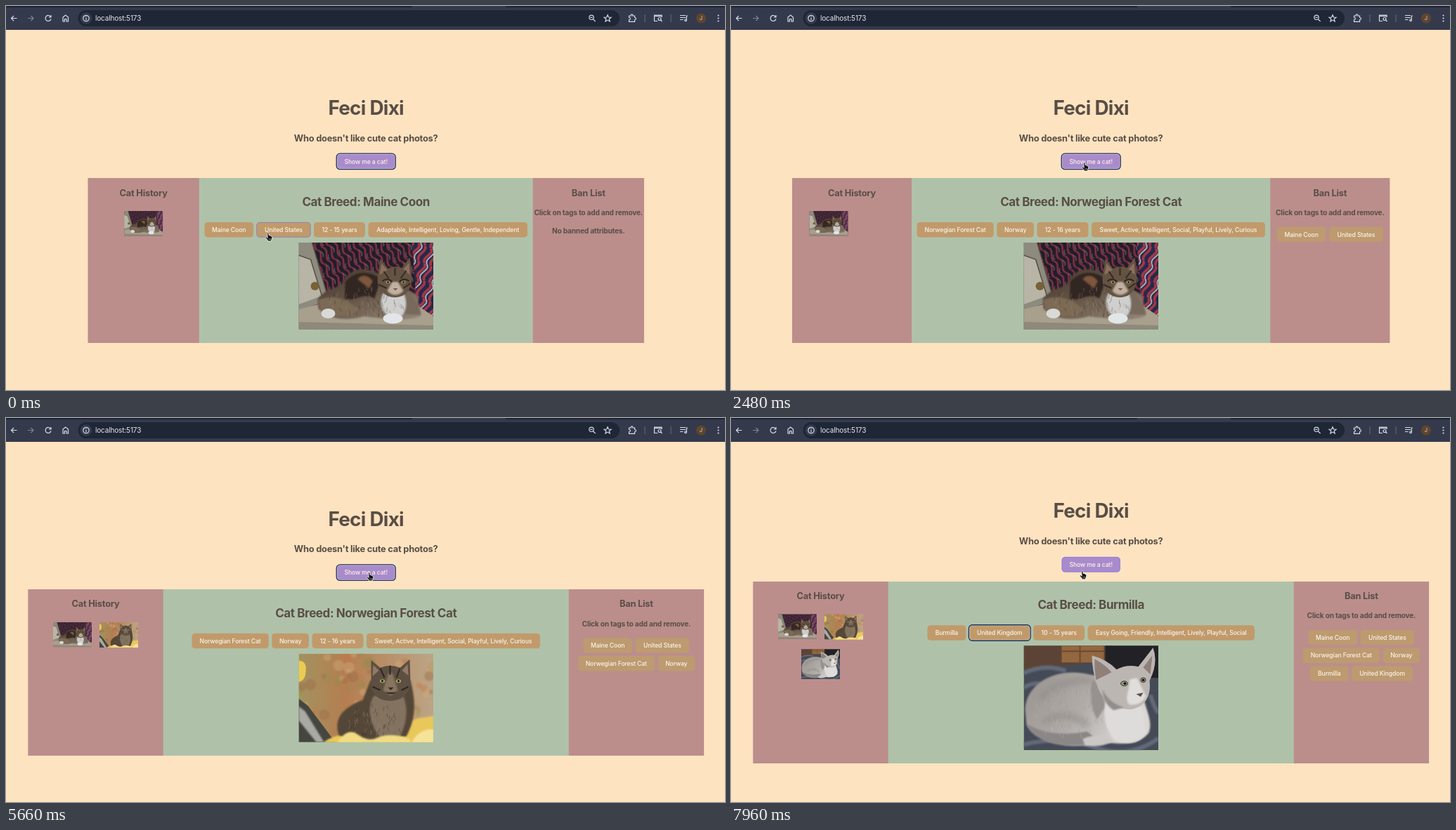
Write an HTML page that moves like this. It is 1023 px wide and 547 px high and loops after 8 s.

```html
<!DOCTYPE html>
<html lang="en">
<head>
<meta charset="utf-8">
<title>Cat photos</title>
<style>
  html, body { margin: 0; width: 100%; height: 100%; overflow: hidden; background: #fee3c1; }
  svg { display: block; }
  #stage { position: absolute; left: 0; top: 0; }
  text { font-family: Inter, Roboto, sans-serif; font-optical-sizing: none; text-anchor: middle; fill: #594e45; }
  .title { font-size: 27.8px; font-weight: 700; letter-spacing: -.025em; }
  .breed { font-size: 17px; font-weight: 700; letter-spacing: -.024em; }
  .head { font-size: 12.8px; font-weight: 700; letter-spacing: -.016em; }
  .note { font-size: 10.1px; font-weight: 700; letter-spacing: -.018em; }
  .tag { font-size: 8.6px; font-weight: 500; letter-spacing: -.011em; fill: #fbf4ea; }
  .url { font-size: 10px; letter-spacing: -.015em; text-anchor: start; fill: #e6e8ee; }
  .avatar { font-size: 7.5px; fill: #e9dccf; }
</style>
</head>
<body>
<svg id="stage" width="1023" height="547" viewBox="0 0 1023 547">
  <defs>
    <filter id="soft" x="-10%" y="-10%" width="120%" height="120%"><feGaussianBlur stdDeviation="1.3"/></filter>
    <filter id="hazy" x="-20%" y="-20%" width="140%" height="140%"><feGaussianBlur stdDeviation="4"/></filter>
    <pattern id="fabric" width="17" height="21" patternUnits="userSpaceOnUse" patternTransform="rotate(-24)">
      <rect width="17" height="21" fill="#211d2b"/>
      <path d="M3 0C11 5-3 14 3 21M12 0C19 7 6 14 12 21" fill="none" stroke="#80303f" stroke-width="2.6"/>
      <path d="M6 3Q10 8 6 12M15 12Q11 16 14 19" fill="none" stroke="#958087" stroke-width=".9"/>
    </pattern>
    <pattern id="flag" width="19" height="23" patternUnits="userSpaceOnUse" patternTransform="rotate(24)">
      <rect width="19" height="23" fill="#25294b"/>
      <path d="M4 0C13 6-3 15 4 23M14 0C21 7 7 15 14 23" fill="none" stroke="#a93745" stroke-width="3.6"/>
      <path d="M8 0C17 6 1 15 8 23" fill="none" stroke="#cfc6cb" stroke-width="1.7"/>
    </pattern>
    <linearGradient id="coat" x1="0" x2="1" y1="0" y2="1">
      <stop stop-color="#44362c"/><stop offset=".5" stop-color="#685849"/><stop offset="1" stop-color="#94877a"/>
    </linearGradient>
    <linearGradient id="autumn" x2="1">
      <stop stop-color="#a2935f"/><stop offset=".35" stop-color="#b67d50"/><stop offset="1" stop-color="#bca586"/>
    </linearGradient>
    <linearGradient id="silver" x1="0" x2="1" y1="0" y2=".4">
      <stop stop-color="#98938f"/><stop offset=".55" stop-color="#b0aba7"/><stop offset="1" stop-color="#dad7d5"/>
    </linearGradient>

    <symbol id="photo0" viewBox="0 0 191.5 123.5" preserveAspectRatio="none">
      <rect width="192" height="124" fill="url(#fabric)"/>
      <path d="M161 0H192V108L168 92Z" fill="url(#flag)"/>
      <path d="M0 0H19L43 82 0 97Z" fill="#8d8b7e"/>
      <path d="M0 18L17 24 33 76 0 88Z" fill="#b8b5a6"/>
      <path d="M19 0L42 80M0 18L17 24 33 76" fill="none" stroke="#5b5146" stroke-width="1.6"/>
      <circle cx="23" cy="62" r="6" fill="#776136"/>
      <path d="M0 95L44 84 165 87 192 105V124H0Z" fill="#a89f8c"/>
      <path d="M0 113L192 118V124H0Z" fill="#8f897b"/>
      <g filter="url(#soft)">
        <path d="M27 80C44 60 57 69 66 52 76 34 101 34 119 48L168 74 174 104C156 114 110 107 93 105 64 113 41 108 28 94Z" fill="url(#coat)"/>
        <path d="M66 56C80 38 104 40 117 52L108 80C90 70 82 85 65 80Z" fill="#332821"/>
        <path d="M84 52C92 44 100 48 105 55L100 65Z" fill="#7d573c"/>
        <path d="M28 82C48 73 70 80 85 96 65 110 43 106 31 96Z" fill="#7c6a55"/>
        <path d="M148 72C165 76 173 90 174 103L150 102Z" fill="#77695b"/>
        <path d="M121 72C114 84 118 99 128 104H147C154 96 154 82 149 72Z" fill="#cfcfce"/>
      </g>
      <g id="strands0"></g>
      <path d="M112 52L116 23 127 37Q138 32 147 36L158 21 161 52C160 69 150 78 137 78 122 78 112 66 112 52Z" fill="#645342"/>
      <path d="M115 46L118 30 126 39ZM149 38L157 29 158 46Z" fill="#8c6f5d"/>
      <path d="M121 41L128 51M137 36V47M153 40L145 51M114 60L125 65M159 58L149 65" stroke="#352a22" stroke-width="2"/>
      <path d="M133 56H141L149 69Q137 80 126 69Z" fill="#bfb1a1" filter="url(#soft)"/>
      <path d="M119 55Q126 49 133 56M143 56Q150 49 157 55" fill="none" stroke="#30251e" stroke-width="2"/>
      <ellipse cx="127" cy="56.5" rx="2.8" ry="1.9" fill="#a8a16b"/><ellipse cx="149" cy="56.5" rx="2.8" ry="1.9" fill="#a8a16b"/>
      <circle cx="127" cy="56.5" r="1.2"/><circle cx="149" cy="56.5" r="1.2"/>
      <path d="M134 65H141L137.5 68.5Z" fill="#84594f"/>
      <ellipse cx="134" cy="108" rx="14" ry="7.5" fill="#e2e6e8"/>
      <ellipse cx="42" cy="101" rx="10" ry="7" fill="#d8dad8"/>
    </symbol>

    <symbol id="photo1" viewBox="0 0 191.5 126" preserveAspectRatio="none">
      <rect width="192" height="126" fill="url(#autumn)"/>
      <g id="leaves" filter="url(#soft)"></g>
      <path d="M0 10Q12 10 10 26 9 39 0 40Z" fill="#eccb52"/>
      <path d="M0 64L13 74 52 126H0Z" fill="#45463f"/>
      <path d="M0 75L9 82 36 126H25L0 95Z" fill="#a9aaa3" filter="url(#soft)"/>
      <path d="M36 126C52 113 68 118 83 109 104 123 127 103 146 114 160 86 174 94 192 88V130H36Z" fill="#e9c85a" filter="url(#soft)"/>
      <g filter="url(#soft)">
        <path d="M57 116C49 92 64 76 91 66L102 38H159C167 69 167 92 153 118L105 126 72 122Z" fill="#554738"/>
        <path d="M107 60C95 78 103 106 117 120H143C152 103 157 82 149 61Z" fill="#82725f"/>
      </g>
      <g id="strands1"></g>
      <path d="M103 42L103 9 116 20Q130 14 144 20L158 8 159 43C156 60 145 67 130 67 114 67 104 59 103 42Z" fill="#5d4f41"/>
      <path d="M105 32L106 16 114 24ZM147 24L155 15 156 31Z" fill="#93796a"/>
      <path d="M128 27H133L141 52 131 60 120 52Z" fill="#877460" filter="url(#soft)"/>
      <path d="M116 21L122 34M130 17V30M144 21L139 34M105 47L116 52M156 47L146 52" stroke="#2e2721" stroke-width="2"/>
      <ellipse cx="119" cy="39" rx="3.6" ry="2.5" fill="#aaa45f"/><ellipse cx="142" cy="39" rx="3.6" ry="2.5" fill="#aaa45f"/>
      <circle cx="119" cy="39" r="1.4"/><circle cx="142" cy="39" r="1.4"/>
      <path d="M127 48H135L131 52ZM123 55Q131 60 139 55" fill="#352b27"/>
      <path d="M54 128Q69 104 84 115T111 120 143 117 158 128Z" fill="#f2dc83" filter="url(#soft)"/>
      <path d="M160 128Q171 106 192 108V128Z" fill="#f6e39a" filter="url(#soft)"/>
    </symbol>

    <symbol id="photo2" viewBox="0 0 191.5 149" preserveAspectRatio="none">
      <rect width="192" height="149" fill="#454a57"/>
      <path d="M0 0H126V22L0 34Z" fill="#5b4436"/>
      <path d="M54 0H114V24H54Z" fill="#93673f"/>
      <path d="M54 8H114M80 0V24" stroke="#6b4a31" stroke-width="2"/>
      <path d="M116 0H192V46H116Z" fill="#222226"/>
      <path d="M0 39Q30 25 60 36M0 60Q15 50 30 56M0 141Q52 128 101 145T192 132M180 70Q186 90 192 96" fill="none" stroke="#626978" stroke-width="6" filter="url(#soft)"/>
      <g filter="url(#soft)">
        <path d="M2 91C3 54 47 28 97 42L119 43 170 72C174 93 184 107 178 124 163 144 132 140 112 137 65 151 16 139 4 113Z" fill="url(#silver)"/>
        <path d="M5 112Q40 132 90 122L108 136C65 150 16 139 5 112Z" fill="#8b8786"/>
        <path d="M98 48Q113 62 116 88L104 105Q90 78 98 48Z" fill="#97928f"/>
      </g>
      <path d="M22 76Q52 46 97 50M28 110Q59 88 92 114" fill="none" stroke="#8a8684" stroke-width="8" opacity=".6" filter="url(#hazy)"/>
      <g id="strands2"></g>
      <path d="M121 70C110 91 114 117 129 134 155 145 169 135 175 122 166 108 176 90 159 75Z" fill="#dedcda" filter="url(#soft)"/>
      <path d="M105 58Q97 36 97 14 119 20 132 34 147 26 163 30L184 3Q192 24 179 50C182 75 170 89 151 91 123 89 111 75 105 58Z" fill="#bbb6b2"/>
      <path d="M103 49Q100 31 101 19 117 28 125 38ZM170 31L183 14 180 41Z" fill="#8f807a"/>
      <path d="M151 48L161 46 174 72Q167 86 150 84 144 76 149 63Z" fill="#e0ddda" filter="url(#soft)"/>
      <path d="M112 62Q121 82 143 88L128 92Q113 83 112 62Z" fill="#918d8a" filter="url(#soft)"/>
      <ellipse cx="143" cy="54" rx="5" ry="3.5" fill="#8d9069" stroke="#37393b"/>
      <ellipse cx="170" cy="49" rx="3.6" ry="3.4" fill="#8d9069" stroke="#37393b"/>
      <circle cx="144" cy="54" r="1.7"/><circle cx="170" cy="49" r="1.6"/>
      <path d="M160 69L170 67 166.5 73Z" fill="#5d4d4b"/>
      <path d="M84 133Q111 121 128 136 110 146 87 142Z" fill="#cbc7c4" filter="url(#soft)"/>
    </symbol>
  </defs>

  <rect width="1023" height="547" fill="#fee3c1"/>
  <g id="page"></g>

  <g id="browser">
    <rect width="1023" height="34" fill="#343a4c"/>
    <rect width="1023" height="2" fill="#1d2435"/>
    <rect x="578" width="133" height="2" fill="#343a4c"/>
    <rect x="102.5" y="6" width="770.5" height="23" rx="11.5" fill="#1f2636"/>
    <circle cx="114" cy="17.5" r="8.3" fill="#343b4d"/>
    <text class="url" x="127" y="21.2">localhost:5173</text>
    <g fill="none" stroke="#d7dbe5" stroke-width="1.2">
      <path d="M15.5 17.5H7.5M11 14L7.5 17.5 11 21"/>
      <path d="M31 17.5H39M35.5 14L39 17.5 35.5 21" stroke="#7d8493"/>
      <path d="M63.5 15.3A4 4 0 1 0 64 18.5M64 13V16H61"/>
      <path d="M81 22V16L84.7 13 88.5 16V22H86V18.5H83.4V22Z"/>
      <circle cx="114" cy="17.5" r="4.2"/><path d="M114 17V20M114 14.8V15.8"/>
      <circle cx="833" cy="16.3" r="3.2"/><path d="M835.4 18.8L838.6 22M831.5 16.3H834.5"/>
      <path d="M856 12.7L857.4 16 861 16.2 858.2 18.5 859.1 22 856 20.1 852.9 22 853.8 18.5 851 16.2 854.6 16Z"/>
      <path d="M886.5 14H889.3Q889 11.8 890.5 11.8T891.7 14H894.5V16.5Q896.5 16.5 896.5 18T894.5 19.5V22.3H886.5V19.5Q888.5 19.5 888.5 18T886.5 16.5Z"/>
      <path d="M909 12V23M946 12V23" stroke="#626a7b" stroke-width="1"/>
      <path d="M927 21.5H922.5V13.2H933V16M922.5 14.5H933"/><circle cx="930" cy="18.5" r="2"/><path d="M931.5 20L933.5 22"/>
      <path d="M959 13.5H967M959 16.5H967M959 19.5H963.5M968.3 20V14H970"/><circle cx="967" cy="20.3" r="1.3"/>
    </g>
    <circle cx="989" cy="17.5" r="7" fill="#60452f"/>
    <text class="avatar" x="989" y="20.2">J</text>
    <g fill="#d7dbe5"><circle cx="1013.5" cy="13.5" r="1.1"/><circle cx="1013.5" cy="17.5" r="1.1"/><circle cx="1013.5" cy="21.5" r="1.1"/></g>
  </g>

  <g id="cursor">
    <path d="M-2.4-5.4C-1.9-6.5-.5-6.3-.3-5.1L.2-2.2C.9-2.7 1.7-2.4 1.9-1.7 2.7-2 3.4-1.6 3.5-.9 4.4-1 4.9-.4 4.8.5L4.4 3 3.4 4.6V6H-1.7V4.7L-4.6 1.3C-5 .4-3.9-.3-3.1.3L-1.8 1.4Z" fill="#111" stroke="#fff" stroke-width=".8" stroke-linejoin="round"/>
    <path d="M0 2V4.4M1.4 2V4.4M2.8 2V4.4" stroke="#ddd" stroke-width=".45"/>
  </g>
</svg>

<script>
const LOOP = 8000, MID = 512.2, GAP = 4.5;
const $ = id => document.getElementById(id);
const SHOW = 'Show me a cat!';

// label and button width
const breeds = [
  { name: 'Maine Coon', height: 123.5, tags: [['Maine Coon', 69.5], ['United States', 77], ['12 - 15 years', 73],
    ['Adaptable, Intelligent, Loving, Gentle, Independent', 226.5]] },
  { name: 'Norwegian Forest Cat', height: 126, tags: [['Norwegian Forest Cat', 109.3], ['Norway', 52.7], ['12 - 16 years', 73],
    ['Sweet, Active, Intelligent, Social, Playful, Lively, Curious', 247]] },
  { name: 'Burmilla', height: 149, tags: [['Burmilla', 54.9], ['United Kingdom', 86.8], ['10 - 15 years', 73],
    ['Easy Going, Friendly, Intelligent, Lively, Playful, Social', 237.3]] }
];
const banOrder = breeds.flatMap(b => b.tags.slice(0, 2));

const events = [
  [0, { breed: 0, photo: 0, bans: 0, focus: SHOW }],
  [440, { focus: 'Maine Coon' }], [520, { bans: 1 }],
  [960, { focus: 'United States' }], [1050, { bans: 2 }],
  [1670, { focus: SHOW }], [2480, { breed: 1 }], [2570, { photo: 1 }],
  [3280, { focus: 'Norwegian Forest Cat' }], [3460, { bans: 3 }],
  [3810, { focus: 'Norway' }], [3980, { bans: 4 }],
  [5660, { focus: SHOW }], [6200, { breed: 2 }], [6290, { photo: 2 }],
  [6820, { focus: 'Burmilla' }], [7000, { bans: 5 }],
  [7260, { focus: 'United Kingdom' }], [7350, { bans: 6 }]
];

// first step, last step, number of steps, end point
const moves = [
  [80, 170, 2, 345, 336], [260, 350, 2, 320, 328], [610, 870, 4, 376.5, 328],
  [1220, 1580, 5, 504, 229], [2920, 3190, 4, 322, 319], [3540, 3720, 3, 405, 320],
  [4150, 4320, 3, 508, 322], [4410, 4940, 7, 620, 322], [5030, 5210, 3, 480, 318],
  [5300, 5570, 4, 518, 226], [6380, 6730, 5, 314, 309.5], [7080, 7170, 2, 378, 310],
  [7520, 7780, 4, 500, 223], [7960, 7960, 1, 501, 223.8]
];

function cursorAt(t) {
  let x = 374, y = 329;
  for (const [from, to, steps, endX, endY] of moves) {
    if (t < from) break;
    const gap = (to - from) / (steps - 1) || 1;
    const k = Math.min(steps, 1 + Math.floor((t - from) / gap + 1e-6)) / steps;
    x += (endX - x) * k;
    y += (endY - y) * k;
  }
  return [x, y];
}

const stateAt = t => Object.assign({}, ...events.filter(e => e[0] <= t).map(e => e[1]));

const sizes = { title: 27.8, breed: 17, head: 12.8, note: 10.1, tag: 8.6 };
const label = (s, x, y, cls) => `<text class="${cls}" x="${x}" y="${y + sizes[cls] * .364}">${s}</text>`;
const box = (x, y, w, h, attrs) => `<rect x="${x}" y="${y}" width="${w}" height="${h}" ${attrs}/>`;
const photo = (i, x, y, w) => `<use href="#photo${i}" x="${x}" y="${y}" width="${w}" height="${w * breeds[i].height / 191.5}"/>`;

function button({ text, x, y, w, fill }, focused, hovered) {
  let out = box(x, y, w, 21.5, `rx="4.5" fill="${fill}"`);
  if (focused) {
    out += box(x + .4, y + .4, w - .8, 20.7, 'rx="4.2" fill="none" stroke="#efe6e0" stroke-width=".7"');
    out += box(x - .5, y - .5, w + 1, 22.5, 'rx="5" fill="none" stroke="#18325a" stroke-width="1.3"');
  } else if (hovered) {
    out += box(x + .3, y + .3, w - .6, 20.9, 'rx="4.3" fill="none" stroke="#6a6ff0" stroke-width=".6"');
  }
  return out + label(text, x + w / 2, y + 10.8, 'tag');
}

function row(tags, center, y, fill) {
  let x = center - (tags.reduce((sum, tag) => sum + tag[1], 0) + GAP * (tags.length - 1)) / 2;
  return tags.map(([text, w]) => {
    const item = { text, x, y, w, fill };
    x += w + GAP;
    return item;
  });
}

const shiftOf = s => (breeds[0].height - breeds[s.photo].height) / 2;

const buttonsOf = s => [
  { text: SHOW, x: 470.7, y: 210.7 + shiftOf(s), w: 83, fill: '#a98bcb' },
  ...row(breeds[s.breed].tags, MID, 308 + shiftOf(s), '#c19a6b')
];

function drawPage(s, buttons, hovered) {
  const up = shiftOf(s);
  const left = s.bans > 2 ? 31.3 : s.breed ? 87 : 116.5;
  const side = (MID - left) * 2 / 5;
  const top = Math.round(245.3 + up), height = Math.round(479.6 - up) - top;
  const historyX = left + side / 2, banX = 2 * MID - historyX;
  let out = label('Feci Dixi', MID, 145 + up, 'title')
    + label("Who doesn't like cute cat photos?", MID, 188 + up, 'head')
    + box(left, top, side * 5, height, 'fill="#bb8e8c"')
    + box(left + side, top, side * 3, height, 'fill="#afc2a9"')
    + label('Cat History', historyX, 266 + up, 'head')
    + label('Ban List', banX, 266 + up, 'head')
    + label('Cat Breed: ' + breeds[s.breed].name, MID, 279 + up, 'breed')
    + label('Click on tags to add and remove.', banX, 294.5 + up, 'note')
    + photo(s.photo, 416.5, 337 + up, 191.5);

  for (let i = 0; i <= s.photo; i++) {
    const alone = i === s.breed && i % 2 === 0;
    const x = historyX + (alone ? 0 : i % 2 ? 33 : -33);
    out += photo(i, x - 27.5, 292 + up + (i >> 1) * 50, 55);
  }

  if (!s.bans) out += label('No banned attributes.', banX, 320 + up, 'note');
  for (let i = 0; i < s.bans; i += 2) {
    const pair = banOrder.slice(i, Math.min(i + 2, s.bans));
    out += row(pair, banX, 314.6 + up + i / 2 * 25.7, '#bd9a6f').map(b => button(b)).join('');
  }
  $('page').innerHTML = out + buttons.map((b, i) => button(b, b.text === s.focus, i === hovered)).join('');
}

function seeded(seed) {
  return () => (seed = seed * 16807 % 2147483647) / 2147483647;
}

function addTexture() {
  const rnd = seeded(42);
  const pick = list => list[Math.floor(rnd() * list.length)];
  let leaves = '';
  for (let i = 0; i < 70; i++) {
    const x = rnd() * 190, y = rnd() * 100;
    leaves += `<circle cx="${x}" cy="${y}" r="${3 + rnd() * 5}" opacity=".45" fill="${pick(['#c07a4b', '#98894f', '#cfa877', '#9c6a48'])}"/>`;
  }
  $('leaves').innerHTML = leaves;
  // centre, radii and two hair colours
  const coats = [[95, 82, 60, 20, '#a4937d', '#392b22'], [108, 94, 42, 24, '#9a8770', '#302820'], [62, 92, 50, 38, '#bfbab6', '#918d8c']];
  coats.forEach(([cx, cy, rx, ry, light, dark], n) => {
    let out = '';
    for (let i = 0; i < 80; i++) {
      const a = rnd() * Math.PI * 2, r = Math.sqrt(rnd());
      out += `<path d="M${cx + rx * r * Math.cos(a)} ${cy + ry * r * Math.sin(a)}q${rnd() * 4 - 2} 3 ${rnd() * 6 - 3} 6" fill="none" stroke="${pick([light, dark])}" stroke-width=".8" opacity=".45"/>`;
    }
    $('strands' + n).innerHTML = out;
  });
}

let lastKey = '';
function render(t) {
  const s = stateAt(t), [x, y] = cursorAt(t);
  const buttons = buttonsOf(s);
  const hovered = buttons.findIndex(b => x - 1 >= b.x && x - 1 <= b.x + b.w && y - 6 >= b.y && y - 6 <= b.y + 21.5);
  const key = JSON.stringify(s) + hovered;
  if (key !== lastKey) drawPage(s, buttons, hovered);
  lastKey = key;
  $('cursor').setAttribute('transform', `translate(${x} ${y})`);
}

addTexture();
const start = performance.now();
function tick() {
  render((performance.now() - start) % LOOP);
  requestAnimationFrame(tick);
}
tick();
</script>
</body>
</html>
```
